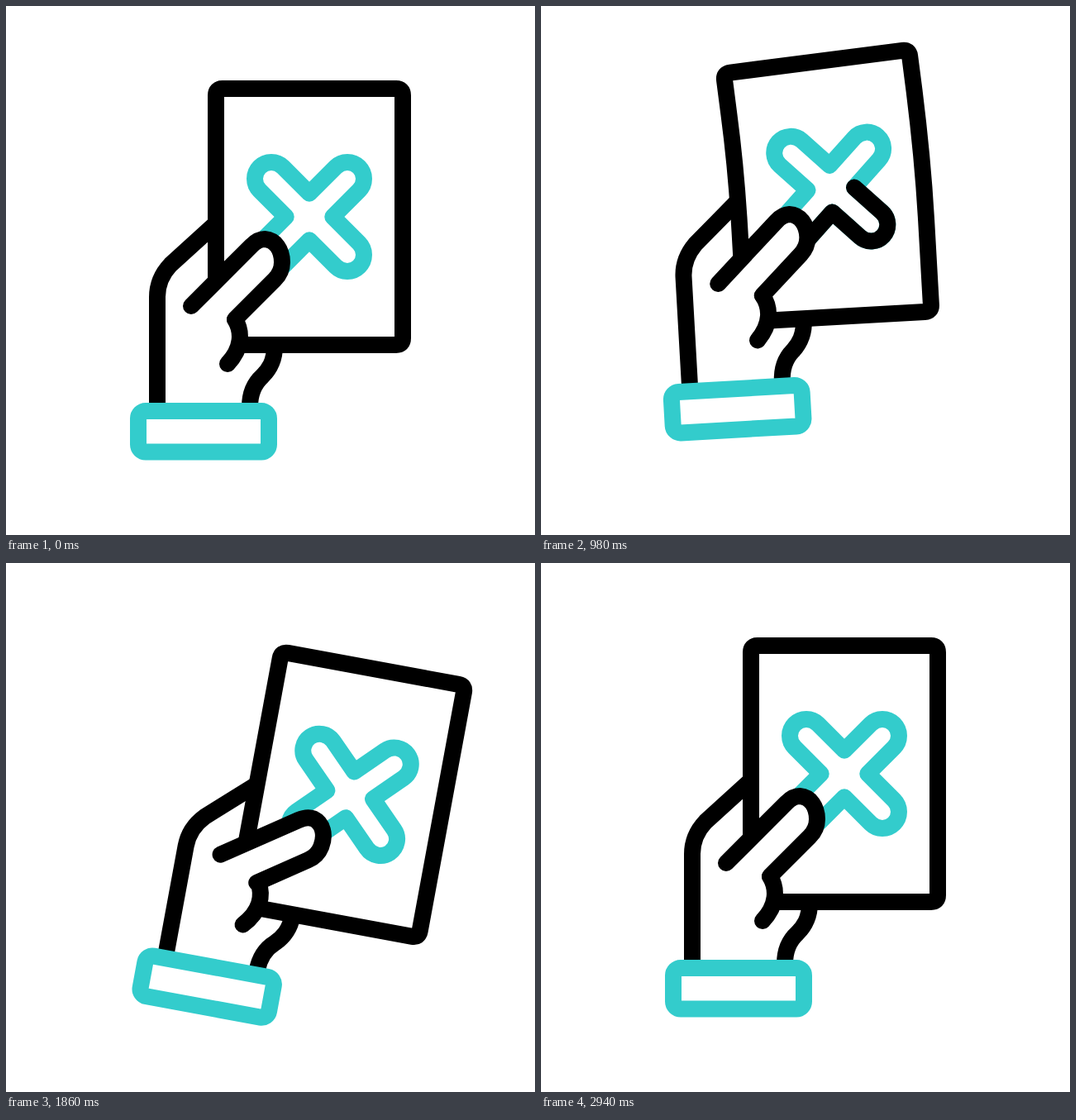
Recreate the animation shown at these times as an HTML page. Size 640x640 px, loop 3 s.

```html
<!DOCTYPE html>
<html lang="en">
<head>
<meta charset="utf-8">
<title>Hand waving a card</title>
<style>
  html, body { margin: 0; width: 100%; height: 100%; overflow: hidden; background: #fff; }
  svg { display: block; width: 100%; height: 100%; }
  path, rect { fill: none; stroke: #000; stroke-width: 20; stroke-linecap: round; stroke-linejoin: round; }
  .white { fill: #fff; }
  .teal { stroke: #33cccc; }
  .bare { stroke: none; }
  #dot { fill: #000; }
</style>
</head>
<body>
<svg viewBox="0 0 640 640">
  <g id="arm">
    <path d="M183 485V352Q183 330 199 313L254 263"/>
    <path d="M325 412C325 430 318 440 310 448C300 457 295 470 295 485"/>
    <path id="card" class="white"/>
    <g transform="translate(367 255)">
      <path id="cross" class="teal"/>
      <path id="trace" pathLength="100"/>
      <rect id="dot" class="bare" x="25" y="-4.5" width="6" height="9"/>
    </g>
    <path class="white bare" d="M277 379C286 394 286 414 268 433H215V365L250 350Z"/>
    <path d="M277 379C286 394 286 414 268 433"/>
    <path id="thumb" class="white" d="M224 363L297 290C303 284 308 282 313 282C326 283 334 295 334 310C334 318 331 325 325 331L277 379"/>
    <rect class="white teal" x="160" y="490" width="158" height="49.5" rx="9"/>
  </g>
</svg>
<script>
const [arm, card, cross, trace, dot, thumb] =
  ['arm', 'card', 'cross', 'trace', 'dot', 'thumb'].map(id => document.getElementById(id));

const LOOP = 3000;
const SWING = 12.5, SWING_START = 600, SWING_TIME = 240, SWINGS = 5;

// Eased rise from 0 to 1 between two times.
function ramp(t, from, to) {
  const u = Math.min(1, Math.max(0, (t - from) / (to - from)));
  return u * u * (3 - 2 * u);
}

// Equal swings from side to side, then a softer settling.
function tilt(t) {
  let angle = 0;
  for (let i = 0; i < SWINGS; i++) {
    const start = SWING_START + i * SWING_TIME;
    const turn = i ? 2 * SWING * (-1) ** i : SWING;
    angle += turn * ramp(t, start, start + SWING_TIME);
  }
  return angle - 16.9 * ramp(t, 1800, 2080) + 8.6 * ramp(t, 2080, 2400) - 4.2 * ramp(t, 2400, 2920);
}

// Dip, rise, hold, drop and settle.
const lift = t =>
  58 * ramp(t, 200, 465) - 85 * ramp(t, 465, 1010) - 15 * ramp(t, 900, 1500) +
  72 * ramp(t, 1720, 1985) - 41 * ramp(t, 1985, 2385) + 11 * ramp(t, 2385, 2920);

const bend = t => -6 * (ramp(t, 750, 1120) - ramp(t, 1480, 1800));

// Four equal arms with round ends, each a quarter turn from the last.
function crossPath() {
  const half = 20, reach = 46, notch = half * Math.SQRT2, side = half / Math.SQRT2;
  let points = [[notch, 0], [reach + side, reach - side], [reach - side, reach + side]];
  let d = '';
  for (let i = 0; i < 4; i++) {
    const [a, b, c] = points;
    d += `${i ? 'L' : 'M'}${a}L${b}A${half} ${half} 0 0 1 ${c}`;
    points = points.map(([x, y]) => [-y, x]);
  }
  return d + 'Z';
}

// Outline of the card with its upper part turned by the given angle.
function cardPath(angle) {
  const c = Math.cos(angle * Math.PI / 180), s = Math.sin(angle * Math.PI / 180);
  const p = (x, y) => {
    const dx = x - 367, dy = y - 225;
    return `${367 + dx * c - dy * s} ${225 + dx * s + dy * c} `;
  };
  return `M254 300Q254 225 ${p(254, 150)}L${p(254, 108)}Q${p(254, 100)}${p(262, 100)}` +
    `L${p(472, 100)}Q${p(480, 100)}${p(480, 108)}L${p(480, 150)}Q480 225 480 300` +
    'V402Q480 410 472 410H262Q254 410 254 402Z';
}

function draw(t) {
  arm.setAttribute('transform', `translate(0 ${lift(t)}) rotate(${tilt(t)} 239 538)`);
  thumb.setAttribute('transform', `rotate(${0.9 * tilt(t - 30)} 270 370)`);
  card.setAttribute('d', cardPath(bend(t)));

  // A black line runs once round the cross; it begins as a small dot.
  const head = 100 * ramp(t, 700, 1360), tail = 100 * ramp(t, 1085, 1855);
  trace.setAttribute('stroke-dasharray', `${head - tail} 200`);
  trace.setAttribute('stroke-dashoffset', -tail);
  trace.style.display = head > 0.6 && tail < 100 ? '' : 'none';
  dot.style.display = head > 0 && head <= 0.6 ? '' : 'none';
}

function tick() {
  draw(performance.now() % LOOP);
  requestAnimationFrame(tick);
}

cross.setAttribute('d', crossPath());
trace.setAttribute('d', crossPath());
tick();
</script>
</body>
</html>
```
